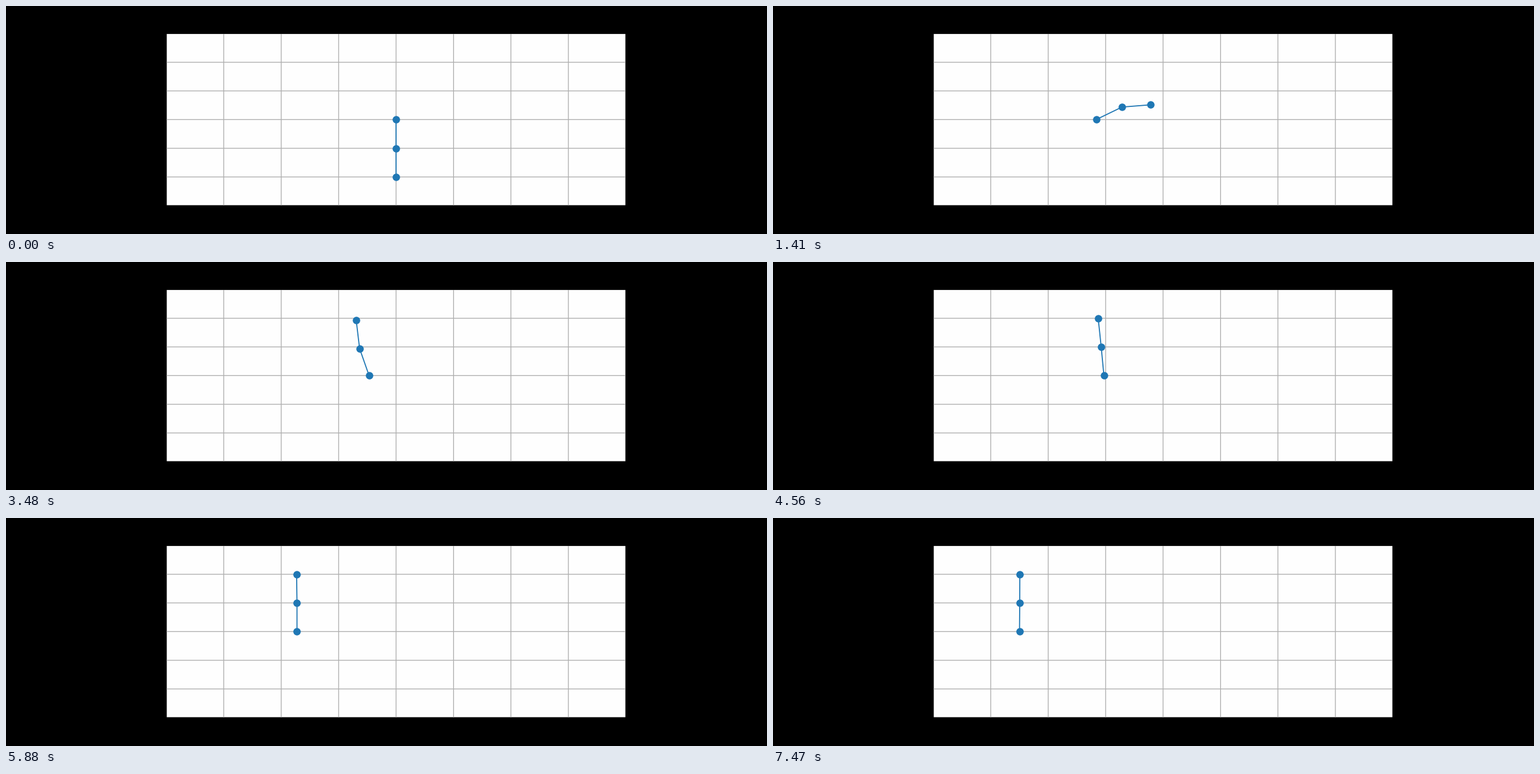
Write a matplotlib script that moves like this. It is 1280 px wide and 384 px high and loops after 7.5 s.

```python
import numpy as np
import matplotlib.pyplot as plt
from matplotlib.animation import FuncAnimation
from matplotlib.patches import Rectangle

W, H, DPI = 1280, 384, 128
FRAMES, STEP = 250, 30
UNIT = 48.3                # rod length in pixels, plot spans 16 x 6 units
CX, CY = 656.1, 191.3      # middle of the plot
FRAME = 0.7                # part of the plot hidden by its black frame

# Key poses: time (s), cart (units), rod angles from upright (deg, clockwise)
POSES = np.array([
    (0.00, 0.00, 180, 180),       # hanging
    (0.45, -0.77, 138, 174),      # pulled left
    (0.78, -1.71, 104, 140.6),
    (1.41, -2.33, 64.1, 85.5),    # cart turns round
    (2.00, -1.29, 8, 43),
    (2.30, -0.56, -25, 23.5),
    (2.64, -0.53, -29.4, 11.4),   # caught from below
    (3.12, -0.89, -13, -2.5),
    (3.48, -0.94, -19.3, -6.8),
    (4.56, -2.06, -5.4, -6),      # upright, gliding left
    (5.88, -3.45, 0, -0.8),
    (7.47, -5.00, 0.5, 0.2),
])


def px(width):
    return width * 72 / DPI


def pose(t):
    """Smooth blend between the two neighbouring key poses."""
    k = min(np.searchsorted(keys, t, side="right"), len(keys) - 1) - 1
    h = keys[k + 1] - keys[k]
    u = (t - keys[k]) / h
    ease = u * u * (3 - 2 * u)
    return (values[k] + (values[k + 1] - values[k]) * ease
            + h * u * (1 - u) * (speed[k] * (1 - u) - speed[k + 1] * u))


keys, values = POSES[:, 0], POSES[:, 1:]
speed = np.gradient(values, keys, axis=0)
speed[0] = 0

fig = plt.figure(figsize=(W / DPI, H / DPI), dpi=DPI, facecolor="black")
ax = fig.add_axes([0, 0, 1, 1])
ax.set_xlim(0, W)
ax.set_ylim(H, 0)
ax.axis("off")

half_w, half_h = 8 * UNIT - FRAME, 3 * UNIT - FRAME
ax.add_patch(Rectangle((CX - half_w, CY - half_h), 2 * half_w, 2 * half_h,
                       color="#fefefe", lw=0, snap=False))
grid = dict(color="#b0b0b0", lw=px(1.4), solid_capstyle="butt", snap=False)
for i in range(-3, 4):
    x = CX + 2 * i * UNIT
    ax.plot([x, x], [CY - half_h, CY + half_h], **grid)
for i in range(-2, 3):
    y = CY + i * UNIT
    ax.plot([CX - half_w, CX + half_w], [y, y], **grid)

rods, = ax.plot([], [], "o-", color="#1f77b4", lw=px(1.8),
                ms=px(12.5), mew=0, snap=False)


def draw(frame):
    cart, *angles = pose(frame * STEP / 1000)
    angles = np.radians(angles)
    xs = CX + UNIT * np.cumsum([cart, *np.sin(angles)])
    ys = CY - UNIT * np.cumsum([0, *np.cos(angles)])
    rods.set_data(xs, ys)
    return rods,


anim = FuncAnimation(fig, draw, frames=FRAMES, interval=STEP,
                     repeat=True, repeat_delay=0, blit=False)
plt.show()
```
